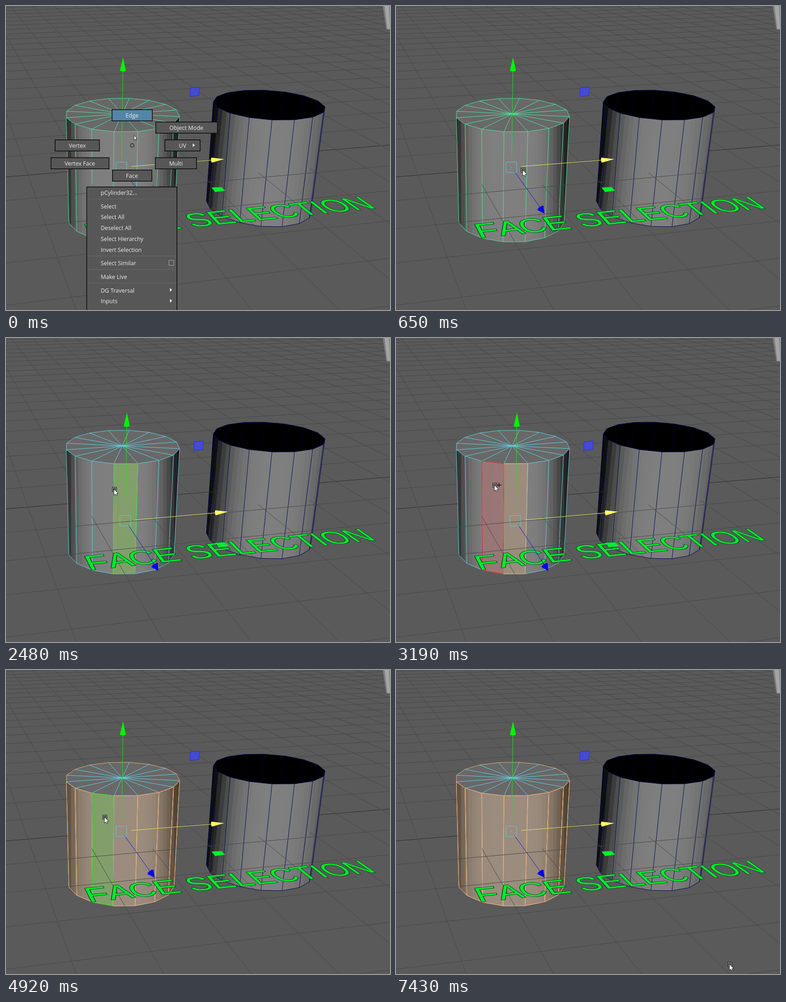
Write an HTML page with a canvas that moves like this. It is 843 px wide and 665 px high and loops after 8000 ms.

```html
<!DOCTYPE html>
<html lang="en">
<head>
<meta charset="utf-8">
<title>Face selection</title>
<style>
html, body { margin: 0; width: 100%; height: 100%; overflow: hidden; background: #5a5a5a; }
canvas { display: block; }
</style>
</head>
<body>
<canvas id="stage" width="843" height="665"></canvas>
<script>
const c = document.getElementById('stage').getContext('2d');
const LOOP = 8000, GREEN = '#00ea30', CYAN = '#64d2e6', ORANGE = '#e8b27e', NAVY = '#080856';
const GROUND = .49; // height share where the cylinders cut the floor

// Perspective view of a 16-sided cylinder: corner k of the ring at depth h (0 top, 1 bottom)
const cylinder = (C, U, V, H, [wu, wv, wh]) => (k, h = 0) => {
  const a = (k - 3) * Math.PI / 8, u = Math.cos(a), v = Math.sin(a);
  const d = 1 + wu * u + wv * v + wh * h;
  return [0, 1].map(i => (C[i] + U[i] * u + V[i] * v + H[i] * h) / d);
};
const left = cylinder([255, 236], [-34.2, 20.2], [119.9, 2.1], [15.5, 262.6], [-.0685, -.016, .074]);
const right = cylinder([574.8, 214.7], [-65.4, 18.1], [91, 7.9], [11.3, 248.3], [-.046, -.0444, .061]);

// Pointer path: time, x, y
const path = [
  [80, 281, 283], [500, 279, 360], [950, 279, 360], [1340, 269, 331], [2040, 269, 331],
  [2480, 238, 332], [2750, 223, 328], [3060, 223, 328], [3190, 217, 323], [6720, 217, 323],
  [6850, 291, 372], [7160, 701, 575], [7430, 733, 645]
];

const span = (a, b, f) => Array.from({ length: b - a + 1 }, (_, i) => f(a + i));

function trace(pts, closed = true) {
  c.beginPath();
  pts.forEach(p => c.lineTo(p[0], p[1]));
  if (closed) c.closePath();
}
function poly(pts, fill, stroke, width = 1) {
  trace(pts);
  if (fill) { c.fillStyle = fill; c.fill(); }
  if (stroke) { c.strokeStyle = stroke; c.lineWidth = width; c.stroke(); }
}
function line(a, b, color, width = 1) {
  trace([a, b], false);
  c.strokeStyle = color; c.lineWidth = width; c.stroke();
}

// Ground plane: a = pencil of receding lines, s = pencil of cross lines
function ground(a, s) {
  const y = (-222 + s * (7341 - 215 * a)) / (1 + s * a);
  return [-161 + a * (y + 215), y];
}
function grid() {
  for (let k = -22; k <= 5; k++) {
    const y = 1000 / (1.698 - k * .137) - 215, s = (y + 222) / 7180;
    line([0, y], [843, y - 843 * s], k ? '#484848' : '#2d2d2d');
  }
  for (let n = -1; n < 20; n++) {
    const a = .577 + .219 * n;
    line([-161 + a * 210, -5], [-161 + a * 885, 670], '#484848');
  }
}

function floorText(text) {
  c.font = '100px "Liberation Sans", Arial, sans-serif';
  const unit = .993 / (c.measureText(text).width - 16), s0 = .1043, s1 = .0998;
  c.textAlign = 'left'; c.textBaseline = 'alphabetic'; c.lineJoin = 'round';
  [...text].forEach((ch, i) => {
    const w = c.measureText(ch).width, wide = w * unit;
    const a = .484 + (c.measureText(text.slice(0, i)).width - 8) * unit;
    const o = ground(a, s0), r = ground(a + wide, s0);
    const b = ground(a + wide / 2, s0), t = ground(a + wide / 2, s1);
    c.save();
    c.transform((r[0] - o[0]) / w, (r[1] - o[1]) / w, (b[0] - t[0]) / 68.8, (b[1] - t[1]) / 68.8, ...o);
    c.strokeStyle = '#0b3d14'; c.lineWidth = 3.5; c.strokeText(ch, 0, 0);
    c.fillStyle = GREEN; c.fillText(ch, 0, 0);
    c.restore();
  });
}

// Narrow bands of grey that fall off on both sides of cx
function shading(cx, toLeft, powLeft, toRight, powRight) {
  const x0 = cx - toLeft, wide = toLeft + toRight, n = 32;
  const g = c.createLinearGradient(x0, 0, x0 + wide, 0);
  for (let i = 0; i < n; i++) {
    const dx = x0 + (i + .5) / n * wide - cx;
    const fall = dx < 0 ? (-dx / toLeft) ** powLeft : (dx / toRight) ** powRight;
    const v = Math.round(127 * (1 - fall));
    g.addColorStop(i / n, `rgb(${v},${v},${v})`);
    g.addColorStop((i + 1) / n, `rgb(${v},${v},${v})`);
  }
  return g;
}

const wall = (cyl, last, h = 0) =>
  [...span(0, last, k => cyl(k, h)), ...span(0, last, k => cyl(last - k, 1))];
const ring = cyl => span(0, 15, k => cyl(k));

function edges(cyl, last, color) {
  for (let k = 0; k <= last; k++) {
    line(cyl(k), cyl(k, 1), color);
    if (k < last) line(cyl(k, 1), cyl(k + 1, 1), color);
  }
}
function gridOver(cyl, last) {
  c.save();
  trace(wall(cyl, last, GROUND)); c.clip();
  grid();
  c.restore();
}

function rightCylinder() {
  c.save();
  trace(wall(right, 8)); c.clip();
  c.fillStyle = '#000'; c.fillRect(430, 180, 280, 310);
  c.transform(1, 0, -.105, 1, 0, 0);
  c.fillStyle = shading(630, 150, 3.6, 160, 2.5);
  c.fillRect(480, 180, 320, 310);
  c.restore();
  poly(ring(right), '#000', NAVY);
  c.save();
  trace(ring(right)); c.clip();
  for (let k = 9; k < 16; k++) line(right(k), right(k, .3), '#00002c');
  c.restore();
  edges(right, 8, NAVY);
}

function leftCylinder(t) {
  const all = t >= 3780, spoke = t < 800 ? '#50e6a2' : CYAN, edge = all ? ORANGE : spoke;
  poly(wall(left, 7), shading(285, 158, 7, 100, 2.5));
  poly(ring(left), '#686868');
  for (const p of ring(left)) line(p, [255, 236], spoke);
  poly(ring(left), null, edge);

  const tint = (i, rgb, alpha, stroke) => poly(
    [left(i), left(i + 1), left(i + 1, 1), left(i, 1)], `rgba(${rgb},${alpha})`, stroke);
  const hover = i => tint(i, '255,92,92', .21, '#ff1414');
  const picked = i => tint(i, '140,255,50', .25, '#1eea1e');
  const member = i => tint(i, '255,185,120', .22, ORANGE);
  const active = all && t < 7000;
  if (all) for (let i = 0; i < 7; i++) if (!active || i !== 2) member(i);
  edges(left, 7, edge);
  if (t >= 1080 && t < 1200) hover(4);
  if (t >= 1200 && t < 1900) hover(3);
  if (t >= 1900 && t < 2600) picked(3);
  if (t >= 2600 && !all) { member(3); hover(2); }
  if (active) picked(2);
}

// Move handles; low = seated on the single picked face
function handles(low) {
  const at = (p, dy) => low ? [p[0] + 8.5, p[1] + dy] : p;
  const quad = (dy, fill, stroke, ...pts) => poly(pts.map(p => at(p, dy)), fill, stroke);
  const arrow = (start, end, dy, size, half, color, shaft) => {
    const tip = at(end, dy), from = at(start, 47);
    const x = tip[0] - from[0], y = tip[1] - from[1], len = Math.hypot(x, y);
    const ux = x / len, uy = y / len, base = [tip[0] - ux * size, tip[1] - uy * size];
    line(from, base, shaft);
    c.fillStyle = color;
    c.beginPath();
    c.ellipse(...base, half / 3, half, Math.atan2(uy, ux), 0, 7);
    c.fill();
    poly([tip, [base[0] - uy * half, base[1] + ux * half], [base[0] + uy * half, base[1] - ux * half]], color);
  };
  arrow([254, 332], [257, 112], 51, 29, 6.5, '#00f400', '#18e818');
  arrow([275, 351], [479, 335], 45, 27, 5.5, '#ffff66', '#e8e86a');
  arrow([260, 362], [326, 454], 55.5, 15, 8, '#0000f5', '#1212d8');
  quad(48, '#444bd2', '#2a2ee0', [404.5, 179], [424.5, 177], [423.5, 196], [403.5, 198]);
  quad(51, '#00ee30', null, [451, 397], [473, 396], [481, 404], [459, 407]);
  quad(47, null, '#62c4d8', [241.5, 341.5], [265, 341.5], [265, 364], [241.5, 364]);
  c.fillStyle = '#62c4d8';
  c.fillRect(...at([252, 352], 47), 2, 1);
}

function label(text, x, y, align = 'left') {
  c.textAlign = align; c.textBaseline = 'alphabetic';
  c.fillStyle = '#eee';
  c.fillText(text, x, y + 5);
}
function box(x, y, w, h, fill) {
  c.fillStyle = '#0a0a0a'; c.fillRect(x, y, w, h);
  c.fillStyle = fill; c.fillRect(x + 1.5, y + 1.5, w - 3, h - 3);
}
const more = (x, y) => poly([[x, y - 4], [x + 4.5, y], [x, y + 4]], '#f2f2f2');

function menu(t) {
  const lit = t < 140 ? 'Edge' : t >= 380 ? 'Face' : '';
  c.font = '12.5px "Open Sans", "Noto Sans", sans-serif';
  const item = (text, x, y) => {
    const w = Math.round(c.measureText(text).width) + 62;
    box(Math.round(x - w / 2), y - 13, w, 26, text === lit ? '#5285a6' : '#575757');
    label(text, x, y, 'center');
  };
  item('Edge', 276.5, 239);
  item('Object Mode', 396, 266);
  item('Vertex', 156.5, 305);
  item('UV', 387.5, 305);
  item('Vertex Face', 162, 344);
  item('Multi', 373, 344);
  item('Face', 276.5, 371);
  more(410, 304.5);
  c.beginPath(); c.arc(277, 305, 3.8, 0, 7);
  c.strokeStyle = '#111'; c.lineWidth = 1.2; c.stroke();

  box(176.5, 395, 199.5, 290, '#575757');
  let y = 408;
  for (const name of ['pCylinder32...', '-', 'Select', 'Select All', 'Deselect All', 'Select Hierarchy',
    'Invert Selection', '-', 'Select Similar', '-', 'Make Live', '-', 'DG Traversal', 'Inputs', 'Outputs']) {
    if (name === '-') {
      line([179, y - 9.5], [374, y - 9.5], '#6b6b6b');
      y += 5.9;
      continue;
    }
    label(name, 208, y);
    if (name === 'Select Similar') {
      c.strokeStyle = '#a8a8a8'; c.lineWidth = 1; c.strokeRect(357.5, y - 6, 11, 11);
    }
    if (/DG|put/.test(name)) more(360, y - .5);
    y += 23.75;
  }
}

function pointer(x, y, k) {
  const shape = [[0, 0], [0, 12], [2.8, 9.6], [4.6, 13.2], [6.4, 12.4], [4.8, 8.8], [8.2, 8.4]];
  poly(shape.map(p => [x + p[0] * k, y + p[1] * k]), '#fff', '#111', .9);
}
function cursorAt(t) {
  const i = path.findIndex(p => p[0] > t);
  if (i < 1) return (i ? path[path.length - 1] : path[0]).slice(1);
  const [a, b] = [path[i - 1], path[i]], f = (t - a[0]) / (b[0] - a[0]);
  return [1, 2].map(j => Math.round(a[j] + (b[j] - a[j]) * f));
}
function cursor(t) {
  const [x, y] = cursorAt(t);
  if (t < 650) return pointer(x, y, .85);
  ['#000', '#e0e0e0', '#000', '#777'].forEach((color, i) => {
    c.fillStyle = color;
    c.fillRect(x - 5 + i, y - 6 + i, 10 - 2 * i, 10 - 2 * i);
  });
  pointer(x - 1, y - 1.5, 1.13);
  c.fillStyle = '#111';
  if (t >= 2750 && t < 4920) c.fillRect(x + 5, y - 2, 9, 1.5);
  if (t >= 2750 && t < 3930) c.fillRect(x + 8.5, y - 6, 1.5, 9);
}

function draw(t) {
  c.fillStyle = '#5a5a5a';
  c.fillRect(0, 0, 843, 665);
  grid();
  poly([[827, 0], [835, 51], [843, 52], [843, 0]], '#7e7e7e');
  poly([[831, 0], [841, 0], [843, 50], [837, 50]], '#a4a4a4');
  rightCylinder();
  leftCylinder(t);
  gridOver(left, 7);
  gridOver(right, 8);
  floorText('FACE SELECTION');
  if (t < 800 || t >= 1900) handles(t >= 1900 && t < 3780);
  if (t < 650) menu(t);
  cursor(t);
}

function tick(now) {
  draw(now % LOOP);
  requestAnimationFrame(tick);
}
draw(0);
requestAnimationFrame(tick);
</script>
</body>
</html>
```
